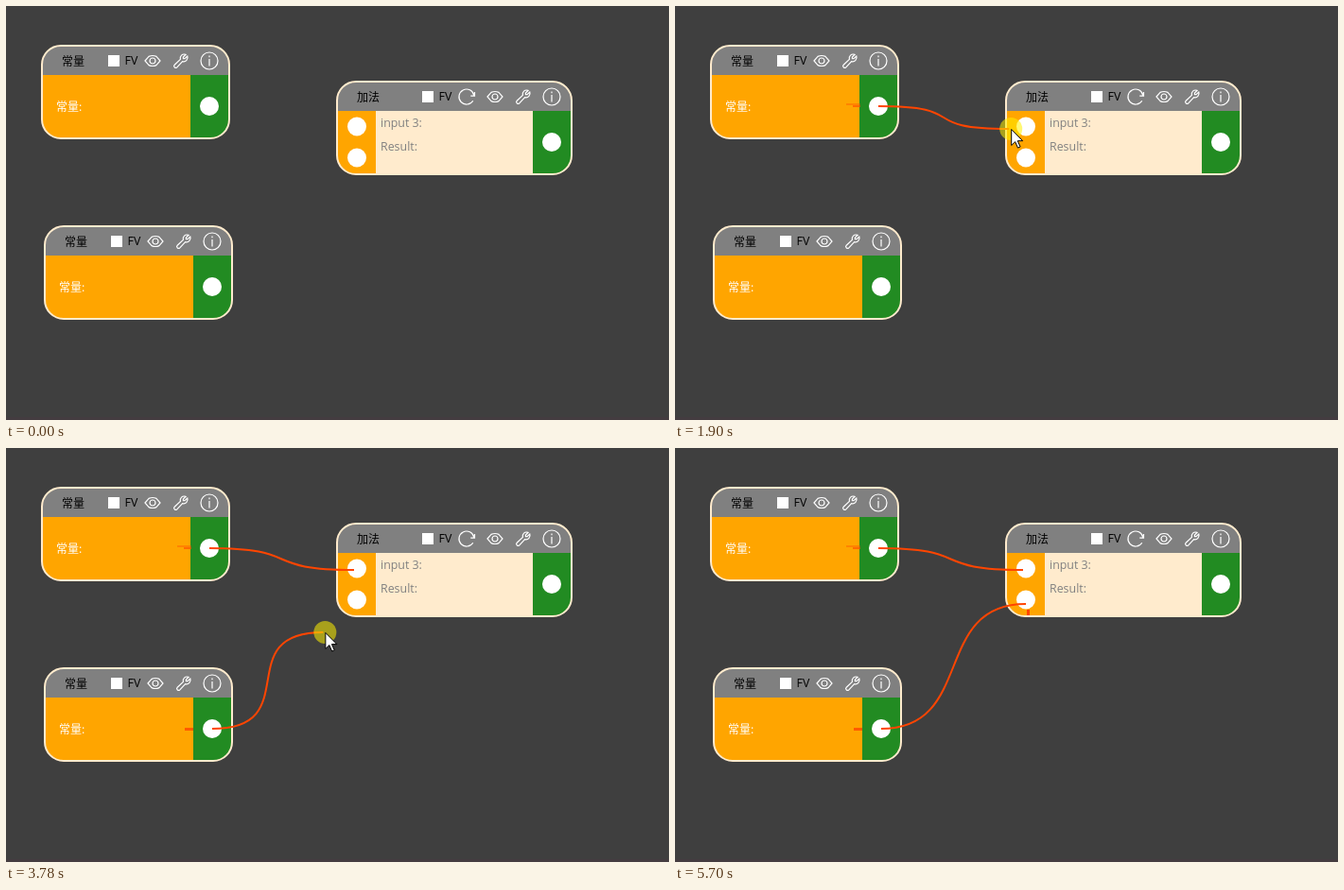
Recreate the animation shown at these times as an HTML page with a canvas. Size 701x438 px, loop 6.36 s.

```html
<!DOCTYPE html>
<html lang="zh">
<head>
<meta charset="utf-8">
<title>Node editor</title>
<style>
  html, body { margin: 0; width: 100%; height: 100%; overflow: hidden; background: #3f3f3f; }
  canvas { display: block; }
</style>
</head>
<body>
<canvas id="stage" width="701" height="438"></canvas>
<script>
const ctx = document.getElementById('stage').getContext('2d');
const LOOP = 6360, START = 590, END = 5690, STEP = 69.05;
const CREAM = '#ffebcd', RED = '#ff4500', ORANGE = '#ffa500', GREEN = '#228b22', GRAY = '#808080';
const CJK = '12px "Noto Sans CJK SC", "Noto Sans CJK", sans-serif';
const LATIN = '12.4px "Open Sans", sans-serif';

const nodes = [
  { x: 37, y: 41, w: 200, title: '常量' },
  { x: 40, y: 232, w: 200, title: '常量' },
  { x: 349, y: 79, w: 250, title: '加法', sum: true },
];

// Pointer waypoints: time, x, y
const path = [
  [590, 268, 381], [935, 237, 104], [1150, 215, 106], [1280, 215, 106],
  [1900, 355, 130], [2040, 370, 129], [2110, 370, 129], [2385, 363, 149],
  [2600, 246, 330], [2740, 234, 322], [2950, 219, 300], [3270, 219, 298],
  [3920, 374, 163], [4050, 374, 163], [4318, 366, 172], [4530, 366, 172],
  [4660, 373, 165], [4800, 373, 165], [5140, 400, 162], [5210, 410, 164], [5690, 609, 438],
];

// Each drag creates a link from an output port
const drags = [
  { from: 1280, to: 2100, port: [215, 106], end: [368, 129] },
  { from: 3270, to: 4720, port: [218, 297], end: [371, 165] },
];

const wrench = new Path2D('M-6.8 4.2L-.6-1.6C-1.6-5 1.6-8 5-6.6L2.4-4V-2.4H4L6.8-5C8-1.6 5 1.6 1.6.6L-4.2 6.8A1.8 1.8 0 0 1-6.8 4.2Z');
const eye = new Path2D('M-8 0L-4-4.6Q0-6.4 4-4.6L8 0L4 4.6Q0 6.4-4 4.6ZM3 0A3 3 0 1 1-3 0A3 3 0 1 1 3 0');
const info = new Path2D('M9 0A9 9 0 1 1-9 0A9 9 0 1 1 9 0M0-5.5V-3.7M0-2V5.5');
const refresh = new Path2D('M6.8 4.2A8 8 0 1 1 7.8-1.6M8.5-5V-.8H4.3');
const arrow = new Path2D('M0 0V17L4 13.2L6.8 19.6L9.4 18.5L6.6 12.2H12Z');

function rect(color, x, y, w, h) {
  ctx.fillStyle = color;
  ctx.fillRect(x, y, w, h);
}

function disc(color, x, y, r) {
  ctx.fillStyle = color;
  ctx.beginPath();
  ctx.arc(x, y, r, 0, 7);
  ctx.fill();
}

function text(str, font, color, x, y) {
  ctx.font = font;
  ctx.fillStyle = color;
  ctx.fillText(str, x, y);
}

function icon(shape, x, y) {
  ctx.save();
  ctx.translate(x, y);
  ctx.strokeStyle = '#fff';
  ctx.lineWidth = 1.2;
  ctx.stroke(shape);
  ctx.restore();
}

function drawNode({ x, y, w, title, sum }, hovered) {
  const right = x + w, shift = sum ? 30 : 0;
  ctx.save();
  ctx.beginPath();
  ctx.roundRect(x + 1, y + 1, w - 2, 98, 20);
  ctx.save();
  ctx.clip();
  rect(sum ? CREAM : ORANGE, x, y, w, 100);
  rect(GRAY, x, y, w, 32);
  if (sum) rect(ORANGE, x, y + 32, 42, 68);
  rect(GREEN, right - 42, y + 32, 42, 68);
  ctx.restore();
  ctx.strokeStyle = hovered ? RED : CREAM;
  ctx.lineWidth = 2;
  ctx.stroke();
  ctx.restore();

  text(title, CJK, '#000', x + 22, y + 22);
  rect('#fff', right - 129 - shift, y + 11, 12, 12);
  text('FV', LATIN, '#000', right - 111.5 - shift, y + 21);
  if (sum) icon(refresh, right - 112, y + 17);
  icon(eye, right - 82, y + 17);
  icon(wrench, right - 52, y + 17);
  icon(info, right - 22, y + 17);

  disc('#fff', right - 22, y + 65, 10);
  if (sum) {
    disc('#fff', x + 22, y + 48.5, 10);
    disc('#fff', x + 22, y + 81.5, 10);
    text('input 3:', LATIN, GRAY, x + 47, y + 49);
    text('Result:', LATIN, GRAY, x + 47, y + 74);
  } else {
    text(title + ':', CJK, '#fff', x + 16, y + 70);
  }
}

function drawLink([x1, y1], [x2, y2]) {
  ctx.strokeStyle = RED;
  ctx.lineWidth = 2;
  ctx.beginPath();
  ctx.moveTo(x1, y1);
  ctx.bezierCurveTo(x1 + 100, y1, x2 - 100, y2, x2, y2);
  ctx.stroke();
}

function pointerAt(t) {
  if (t < START || t >= END) return null;
  const i = path.findIndex(p => p[0] > t);
  const [t0, x0, y0] = path[i - 1], [t1, x1, y1] = path[i];
  const k = (t - t0) / (t1 - t0);
  return [x0 + (x1 - x0) * k, y0 + (y1 - y0) * k];
}

function render(time) {
  const t = time < START ? 0 : START + Math.floor((time - START + 6) / STEP) * STEP;
  const pointer = pointerAt(t);
  const dragging = drags.some(d => t >= d.from && t < d.to);
  const inside = n => pointer && !dragging &&
    pointer[0] >= n.x && pointer[0] < n.x + n.w && pointer[1] >= n.y && pointer[1] < n.y + 100;

  rect('#3f3f3f', 0, 0, 701, 438);
  rect('#443c40', 0, 435, 701, 3);
  for (const n of nodes) drawNode(n, inside(n));

  // Short strokes left behind by the dragged links
  if (t >= 1280) {
    rect('rgba(255,69,0,.35)', 181, 103, 15, 2);
    rect('rgba(255,69,0,.6)', 188, 105, 8, 2);
  }
  if (t >= 3300) rect('#ff5a00', 189, 296, 9, 3);
  if (t >= 4720) rect(RED, 372, 171, 3, 6);

  for (const d of drags) {
    if (t < d.from) continue;
    drawLink(d.port, t < d.to ? [pointer[0] - 2, pointer[1]] : d.end);
  }

  if (!pointer) return;
  if (dragging) disc('rgba(255,240,0,.55)', ...pointer, 12);
  ctx.save();
  ctx.translate(pointer[0] + .5, pointer[1] + .5);
  ctx.fillStyle = '#fff';
  ctx.fill(arrow);
  ctx.strokeStyle = '#000';
  ctx.lineWidth = 1;
  ctx.stroke(arrow);
  ctx.restore();
}

const origin = performance.now();
function tick() {
  render((performance.now() - origin) % LOOP);
  requestAnimationFrame(tick);
}
tick();
</script>
</body>
</html>
```
